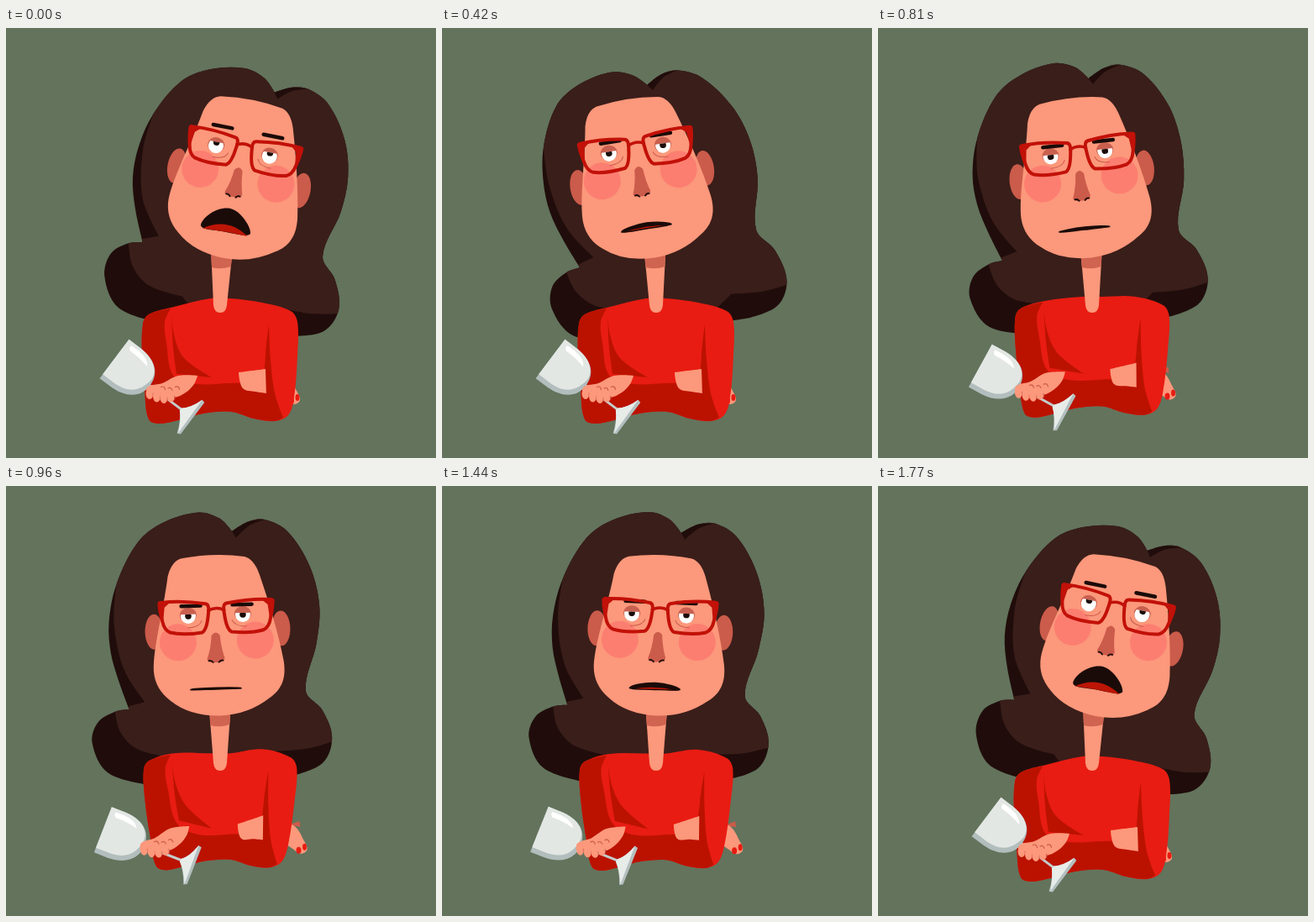
Write an HTML page with a canvas that moves like this. It is 512 px wide and 512 px high and loops after 1.8 s.

```html
<!DOCTYPE html>
<html lang="en">
<head>
<meta charset="utf-8">
<title>Eye roll</title>
<style>
html, body { margin: 0; width: 100%; height: 100%; overflow: hidden; background: #63735c; }
canvas { display: block; }
</style>
</head>
<body>
<canvas id="stage" width="512" height="512"></canvas>
<script>
const ctx = document.getElementById('stage').getContext('2d');
const LOOP = 1800, RAD = Math.PI / 180;
const SKIN = '#fc987b', SHADE = '#cb5b4a', HAIR = '#3a1e1a', DARK = '#200d0b';
const RED = '#e81c12', DEEP = '#bb1200', FRAME = '#c21108', INK = '#1a0b09';

const clamp = v => Math.min(1, Math.max(0, v));
const ease = v => { v = clamp(v); return v * v * (3 - 2 * v); };

// Three poses: groan (tilted right), glare (tilted left), slump (low and level)
function poseAt(t) {
  const toGlare = ease((t + 40) / 585);
  const toSlump = ease((t - 570) / 515);
  const toGroan = ease((t - 1320) / 440);
  return {
    groan: 1 - toGlare + toGroan,
    glare: toGlare - toSlump,
    slump: toSlump - toGroan,
    tilt: 11.5 * (1 - 2 * toGlare + toSlump + toGroan)
  };
}

// Key points of the slumped pose; a third value marks a sharp corner
const hairOutline = [[151,262,1], [140,228], [132,195], [131,158], [140,112], [165,62], [195,39], [237,28],
  [262,36], [277,52,1], [296,41], [316,39], [343,54], [370,97], [382,145], [376,190], [361,245], [380,268],
  [391,300], [380,330], [345,345,1], [168,352,1], [122,336], [105,300], [113,276], [134,264]];
const hairFront = [[140,112,1], [170,20], [300,0], [400,60], [405,200], [400,302,1], [362,313], [325,316,1],
  [256,360], [198,321,1], [158,309], [139,288], [134,262,1], [170,254,1], [147,215], [137,160]];
const parting = [[277,52,1], [296,41], [316,39,1], [297,46], [282,60,1]];

// Key points of the upright body
const torso = [[163,352], [170,341], [200,332], [243,322], [267,322], [305,327], [339,337], [347,350],
  [347,390], [343,440], [336,461], [320,468], [295,465], [268,457], [235,459], [205,467], [183,471],
  [170,466], [165,430], [162,390]];
const sleeve = [[163,352], [170,341], [196,334,1], [189,350], [191,375], [200,415], [228,424], [280,423],
  [309,430], [330,464,1], [320,468], [295,465], [268,457], [235,459], [205,467], [183,471], [170,466],
  [165,430], [162,390]];
const chestShade = [[197,334,1], [200,365], [212,393], [245,416,1], [203,412,1], [199,380]];
const armShade = [[313,353,1], [315,395], [320,435], [330,464,1], [309,440], [309,390]];
const cuff = [[277,410,1], [309,406,1], [310,435,1], [297,433], [282,429]];
const hand = [[228,414,1], [205,414], [186,423], [168,428], [172,437], [200,440], [214,434], [224,424]];
const farHand = [[335,402], [346,404], [356,420], [360,431], [353,436], [344,431], [333,421]];

// Closed smooth shape
function blob(pts, color) {
  const n = pts.length, at = i => pts[(i + n) % n];
  const handle = (i, len) => {
    const p = at(i), a = at(i - 1), b = at(i + 1);
    const dx = b[0] - a[0], dy = b[1] - a[1], k = p[2] ? 0 : len / 3 / (Math.hypot(dx, dy) || 1);
    return [p[0] + dx * k, p[1] + dy * k];
  };
  ctx.beginPath();
  ctx.moveTo(pts[0][0], pts[0][1]);
  for (let i = 0; i < n; i++) {
    const p = at(i), q = at(i + 1), len = Math.hypot(q[0] - p[0], q[1] - p[1]);
    ctx.bezierCurveTo(...handle(i, len), ...handle(i + 1, -len), q[0], q[1]);
  }
  ctx.fillStyle = color;
  ctx.fill();
}

function fill(d, color) {
  ctx.fillStyle = color;
  ctx.fill(new Path2D(d));
}
function line(d, color, width) {
  ctx.strokeStyle = color;
  ctx.lineWidth = width;
  ctx.stroke(new Path2D(d));
}
function oval(x, y, rx, ry, color) {
  ctx.beginPath();
  ctx.ellipse(x, y, rx, ry, 0, 0, 7);
  ctx.fillStyle = color;
  ctx.fill();
}
function group(x, y, degrees, draw) {
  ctx.save();
  ctx.translate(x, y);
  ctx.rotate(degrees * RAD);
  draw();
  ctx.restore();
}

// The crown turns with the head; the curls turn less, droop when upright and drag behind
function drawHair({ tilt, slump }, drag) {
  const rise = 1 - slump;
  const place = ([x, y, sharp]) => {
    const low = clamp((y - 145) / 155);
    const a = (tilt * (1 - low / 4) + Math.sign(x - 256) * 7 * low * rise) * RAD;
    const c = Math.cos(a), s = Math.sin(a);
    const dx = x - 256, dy = y - 290 + 19 * rise * clamp((200 - y) / 172);
    return [256 + dx * c - dy * s + 12 * low * rise + drag * clamp((y - 28) / 120),
      290 + dx * s + dy * c, sharp];
  };
  group(0, 0, 0, () => {
    blob(hairOutline.map(place), DARK);
    ctx.clip();
    blob(hairFront.map(place), HAIR);
    blob(parting.map(place), DARK);
  });
}

function drawGlass(slump) {
  group(129 - 16 * slump, 394 + 18 * slump, 37 - 18.5 * slump, () => {
    line('M50 0H104', '#c3cccb', 3);
    fill('M99 -1Q108 -8 113 -24L117 -23V24L113 26Q107 10 99 2Z', '#b4bfbf');
    fill('M99 -1Q108 -8 113 -24L114 25Q107 10 99 2Z', '#e7ece9');
    fill('M0 -29H18C45 -28 53 -14 53 0C53 15 42 28 18 29H0Z', '#b2bdbd');
    fill('M0 -29H18C44 -28 51 -14 50 -5C47 13 38 22 18 23H0Z', '#e3e7e3');
    fill('M7 -25H18Q33 -24 37 -16Q31 -18 18 -19H9Q5 -22 7 -25Z', '#fff');
  });
}

function drawHand(slump) {
  group(195 - 9 * slump, 430 - 6 * slump, -8 * slump, () => {
    ctx.translate(-195, -430);
    blob(hand, SKIN);
    for (let i = 0; i < 4; i++) {
      const x = 171 + 8.5 * i, y = 435 + 5 * Math.sin(i * .8);
      oval(x, y, 4.5, 7, SKIN);
      line(`M${x + 4.2} ${y}v4`, SHADE, 1);
      if (i) line(`M${x + 5} ${y - 11}q4 -2 5 3`, SHADE, 1.2);
    }
  });
}

function drawFarHand(slump) {
  const rise = 1 - slump;
  group(-10 * rise, 12 * rise, 0, () => {
    fill('M338 402L351 397L352 404Z', SHADE);
    blob(farHand, SKIN);
    oval(350, 432, 3, 4, RED);
    oval(357, 428, 2.5, 4, RED);
  });
}

// Slumping lifts the body around the neck and narrows it toward the elbows
function drawBody({ slump, tilt }) {
  const place = ([x, y, sharp]) => {
    const low = clamp((y - 340) / 130), out = clamp(Math.abs(x - 255) / 45);
    return [x + slump * low * (256 - x) * .12, y - 16 * slump * Math.max(low, out), sharp];
  };
  const part = (pts, color) => blob(pts.map(place), color);
  drawFarHand(slump);
  part(torso, RED);
  for (const shade of [sleeve, chestShade, armShade]) part(shade, DEEP);
  part(cuff, SKIN);
  drawGlass(slump);
  drawHand(slump);
  const n = tilt * .18;
  fill(`M${242 + n} 262H${268 + n}L263 330Q262 339 255 339Q248 339 247 330Z`, SKIN);
  fill(`M${242 + n} 262H${268 + n}L${266.5 + n * .7} 284Q255 288 ${243.5 + n * .7} 285Z`, '#cf6450');
}

function drawEye(x, lid, pupil) {
  const y = 141;
  oval(x, y - 1, 10, 9, '#c9604f');
  ctx.save();
  ctx.beginPath();
  ctx.rect(x - 12, y + lid, 24, 20);
  ctx.clip();
  oval(x, y, 9, 9, '#fff');
  oval(x, y + pupil, 3.8, 3.8, INK);
  ctx.restore();
}

// Half of the glasses; the other half is mirrored
function drawLens() {
  line('M190 124Q215 122 243 127Q248 128 246 139Q244 158 238 161Q215 164 200 160Q193 157 191 146Q188 133 188 127Q187 124 190 124Z',
    FRAME, 4);
  fill('M187 126Q187 123 191 123L201 124L194 130L192 147L188 137Z', FRAME);
}

function drawMouth(open, y) {
  group(252.5, y, 0, () => {
    const pt = (x, v) => `${x} ${v * open} `;
    const lips = 'M' + pt(-30, -3) + 'C' + pt(-29, -14) + pt(-14, -30) + pt(1, -30) +
      'C' + pt(13, -30) + pt(30, -12) + pt(30, -4) + 'C' + pt(29, 1) + pt(14, 0) + pt(0, 0) +
      'C' + pt(-14, 0) + pt(-29, 4) + pt(-30, -3) + 'Z';
    fill(lips, INK);
    fill('M' + pt(-27, 1) + 'Q' + pt(0, -19) + pt(27, 0) + 'Q' + pt(0, -1) + pt(-27, 1) + 'Z', '#bd1506');
    if (open < .5) line(lips, INK, 2 - 2 * open);
  });
}

function drawHead({ tilt, slump, groan, glare }) {
  const open = ease(groan / .55), brow = 117 + 12 * (1 - open);
  const look = 15 * slump + 3 * (tilt / 11.5) ** 2;
  group(255, 290, tilt, () => {
    ctx.translate(-256, -290);
    for (const x of [181, 332]) oval(x, 178 - look / 2, 11, 21, SHADE);
    fill('M199 106Q204 88 216 85Q255 79 291 85Q302 88 308 106C318 138 329 178 334 210' +
      'C337 232 330 245 316 254Q290 273 257 273.5Q220 273 198 254Q180 240 179 218C179 190 192 150 199 106Z', SKIN);
    drawMouth(.03 + .92 * open + .1 * glare, 242.5 - 6 * glare * (1 - open));
    ctx.translate(0, look);
    for (const x of [209, 301]) oval(x, 172, 22, 22, 'rgba(253,102,104,.5)');
    fill('M249 165Q254 158 259 165Q260 180 264 192Q263 198 253.5 197Q244 198 243 193Q248 180 249 165Z', SHADE);
    line('M245 195q3 -1 5 2M257 197q2 -3 5 -2', INK, 1.8);
    for (const x of [222, 287]) drawEye(x, -2 - 2.5 * open, -4 * open);
    line('M221 155Q235 155 238 147M291 155Q277 155 274 147', SHADE, 1);
    line(`M214 ${brow}H237M275 ${brow}H298`, INK, 4.5);
    line('M246 135Q256 130 265 135', FRAME, 3.5);
    drawLens();
    ctx.translate(511, 0);
    ctx.scale(-1, 1);
    drawLens();
  });
}

function render() {
  let t = Math.floor(performance.now() % LOOP / 30) * 30;
  if (t > 1760) t -= LOOP;
  const pose = poseAt(t), drag = 2 * (poseAt(t - 80).tilt - pose.tilt);
  ctx.fillStyle = '#63735c';
  ctx.fillRect(0, 0, 512, 512);
  ctx.lineCap = ctx.lineJoin = 'round';
  drawHair(pose, drag);
  drawBody(pose);
  drawHead(pose);
  requestAnimationFrame(render);
}
render();
</script>
</body>
</html>
```
